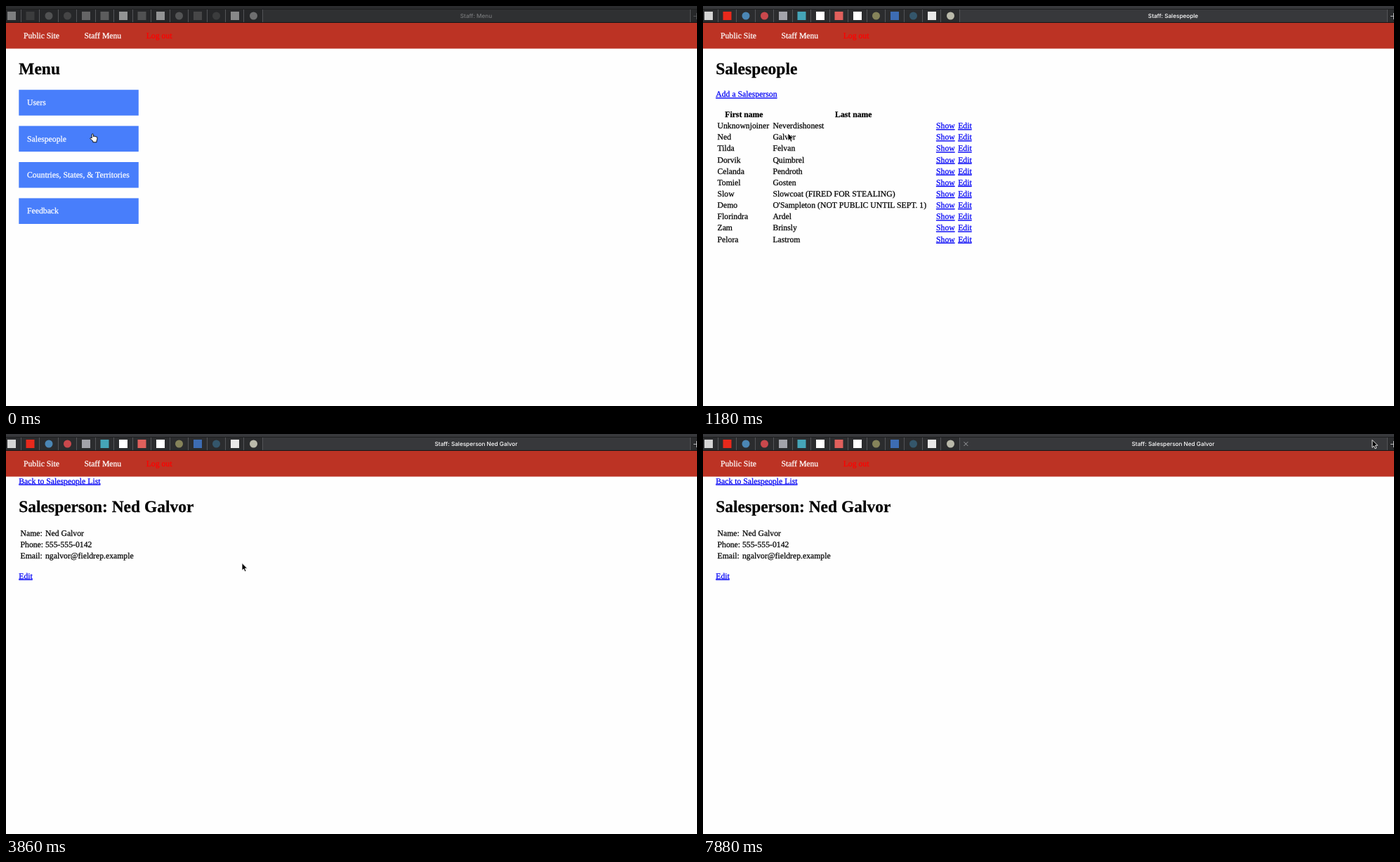
Recreate the animation shown at these times as an HTML page. Size 984 px wide and 569 px high, loop 8000 ms.

```html
<!DOCTYPE html>
<html lang="en">
<head>
<meta charset="utf-8">
<title>Staff</title>
<style>
  html, body { margin: 0; width: 984px; height: 569px; overflow: hidden; background: #fefefe; }
  svg { display: block; }
  text {
    font: 11.73px "Liberation Serif", Times, serif; text-rendering: geometricPrecision; white-space: pre;
    color: #000; fill: currentColor; stroke: currentColor; stroke-width: .25;
  }
  .h1 { font-size: 23.47px; font-weight: bold; }
  .th { font-weight: bold; text-anchor: middle; }
  .link { color: #0000f5; text-decoration: underline; }
  .light { color: #fff; }
  .alert { color: #f00; }
  .tab { font: 500 8.2px Inter, sans-serif; text-anchor: middle; stroke: none; }
</style>
</head>
<body>
<svg id="stage" width="984" height="569" viewBox="0 0 984 569"></svg>
<script>
const NS = 'http://www.w3.org/2000/svg';
const stage = document.getElementById('stage');

function add(parent, tag, attrs = {}, content) {
  const el = document.createElementNS(NS, tag);
  for (const key in attrs) el.setAttribute(key, attrs[key]);
  if (content) el.textContent = content;
  parent.appendChild(el);
  return el;
}
const rect = (p, x, y, width, height, fill) => add(p, 'rect', { x, y, width, height, fill });
const label = (p, x, y, str, cls = '') => add(p, 'text', { x, y, class: cls }, str);
const group = () => add(stage, 'g');

const LOOP = 8000;
const ROW = 16.14;
const PERSON = 'Ned Galvor';

// Browser tab strip
const bar = group();
const strip = rect(bar, 0, 0, 984, 24, '#343538');
const tabs = rect(bar, 0, 5, 984, 18, '#2c2d2f');
const current = rect(bar, 366, 5, 608, 18, '#37383b');
rect(bar, 0, 4, 984, 1, '#1d1e1f');
rect(bar, 0, 23, 984, 1, '#151516');
const icons = add(bar, 'g');
const iconColors = ['#d4d4d4', '#e8291c', '#4b86b4', '#c9484c', '#a2a3aa', '#45a5b8', '#fff',
  '#e0605c', '#fff', '#85835a', '#3d6cb3', '#34566b', '#e8e8e8', '#b9b9aa'];
const round = [2, 3, 9, 11, 13];
iconColors.forEach((fill, i) => {
  const cx = 8 + i * 26.5;
  if (round.includes(i)) add(icons, 'circle', { cx, cy: 14, r: 5.5, fill });
  else rect(icons, cx - 6, 8, 12, 12, fill);
  rect(bar, Math.round(20.7 + i * 26.48), 5, 1, 18, '#535457');
});
rect(bar, 974, 5, 1, 18, '#535457');
const plus = add(bar, 'path', { d: 'M979 14.5H988M983.5 10V19', stroke: '#b8b8ba' });
const close = add(bar, 'path', { d: 'M371.5 11.2L377.3 17M377.3 11.2L371.5 17', stroke: '#a9aaad', 'stroke-width': 0.9 });
const title = label(bar, 669.5, 17, '', 'tab');

// Site navigation
const nav = group();
rect(nav, 0, 24, 984, 36.6, '#bc3324');
label(nav, 24.9, 46.1, 'Public Site', 'light');
label(nav, 111.4, 46.1, 'Staff Menu', 'light');
label(nav, 199.7, 46.1, 'Log out', 'alert');

// Menu page
const menu = group();
label(menu, 18.3, 97.4, 'Menu', 'h1');
const buttons = ['Users', 'Salespeople', 'Countries, States, & Territories', 'Feedback'].map((str, i) => {
  const y = 119.2 + i * 51.4;
  const box = rect(menu, 18.3, y, 170.5, 36.6, '#487efb');
  label(menu, 30, y + 22, str, 'light');
  return box;
});

// List page
const list = group();
label(list, 18.3, 97.4, 'Salespeople', 'h1');
label(list, 18.3, 129.4, 'Add a Salesperson', 'link');
label(list, 58.4, 158, 'First name', 'th');
label(list, 214.3, 158, 'Last name', 'th');
[
  ['Unknownjoiner', 'Neverdishonest'],
  PERSON.split(' '),
  ['Tilda', 'Felvan'],
  ['Dorvik', 'Quimbrel'],
  ['Celanda', 'Pendroth'],
  ['Tomiel', 'Gosten'],
  ['Slow', 'Slowcoat (FIRED FOR STEALING)'],
  ['Demo', "O'Sampleton (NOT PUBLIC UNTIL SEPT. 1)"],
  ['Florindra', 'Ardel'],
  ['Zam', 'Brinsly'],
  ['Pelora', 'Lastrom']
].forEach(([first, last], i) => {
  const y = 174.2 + i * ROW;
  label(list, 20.5, y, first);
  label(list, 99.4, y, last);
  label(list, 332, y, 'Show', 'link');
  label(list, 363.2, y, 'Edit', 'link');
});

// Detail page
const detail = group();
label(detail, 18.3, 70.6, 'Back to Salespeople List', 'link');
label(detail, 18.3, 110.6, 'Salesperson: ' + PERSON, 'h1');
[
  ['Name:', PERSON],
  ['Phone:', '555-555-0142'],
  ['Email:', 'ngalvor@fieldrep.example']
].forEach(([key, value], i) => {
  label(detail, 20.5, 144.7 + i * ROW, key);
  label(detail, 56, 144.7 + i * ROW, value);
});
label(detail, 18.3, 205.7, 'Edit', 'link');

// Pointer
const pointer = group();
const arrow = add(pointer, 'path', {
  d: 'M0 0V10.8L2.4 8.5 4.1 12.3 6 11.5 4.4 7.7H7.7Z',
  fill: '#000', stroke: '#fff', 'stroke-width': 0.9
});
const hand = add(pointer, 'path', {
  d: 'M1.2 7V2a1.1 1.1 0 0 1 2.2 0V5a1 1 0 0 1 2 .1a1 1 0 0 1 1.9 .3a.9 .9 0 0 1 1.6 .6V8.5L8 11V12.8H2.8V11L-.9 8a1 1 0 0 1 1.3-1.5Z',
  fill: '#fff', stroke: '#000', 'stroke-width': 0.9
});

// Step tables: [start ms, value...]
const ARROW = 0, HAND = 1;
const moves = [
  [0, 121, 181, HAND], [740, 121, 181, ARROW],
  [1930, 145, 177, ARROW], [2080, 206, 169, ARROW], [2230, 261, 166.5, ARROW], [2380, 295, 168, ARROW],
  [2520, 315, 172, ARROW], [2670, 328, 177, ARROW], [2820, 333, 181, HAND], [2970, 335, 182, HAND],
  [3120, 335, 184, HAND], [3260, 335.5, 185, HAND], [3410, 336, 183.5, HAND], [3710, 336, 183.5, ARROW],
  [5210, 362, 137, ARROW], [5350, 405, 62, ARROW], [5500, 433, 13, ARROW],
  [6390, 447, 9, ARROW], [6540, 482, 11, ARROW], [6690, 505, 12.5, ARROW],
  [7290, 652, 13, ARROW], [7440, 845, 13, ARROW], [7740, 915, 10, ARROW], [7880, 953, 8.5, ARROW]
];
const pages = [
  [0, menu, 'Staff: Menu'],
  [1180, list, 'Staff: Salespeople'],
  [3860, detail, 'Staff: Salesperson ' + PERSON]
];
const hover = [[0, '#487efb'], [150, '#3e6edb'], [590, '#4172e2'], [740, '#3e6edb']];
const closing = [[0, 0], [5500, 0.15], [6390, 1]];

const at = (steps, t) => steps.findLast(step => step[0] <= t);

function draw(t) {
  const [, page, name] = at(pages, t);
  for (const [, p] of pages) p.style.display = p === page ? '' : 'none';
  if (title.textContent !== name) title.textContent = name;

  const active = t >= 150;
  strip.setAttribute('fill', active ? '#38393c' : '#2b2c2e');
  tabs.setAttribute('fill', active ? '#2b2c2e' : '#262729');
  current.setAttribute('fill', active ? '#37383b' : '#2f3032');
  title.style.color = active ? '#fff' : '#77787a';
  icons.style.filter = active ? 'none' : 'grayscale(1) opacity(.5)';
  plus.style.opacity = active ? 1 : 0.3;
  close.style.opacity = at(closing, t)[1];
  buttons[1].setAttribute('fill', at(hover, t)[1]);

  const [, x, y, shape] = at(moves, t);
  pointer.setAttribute('transform', `translate(${x} ${y})`);
  arrow.style.display = shape === ARROW ? '' : 'none';
  hand.style.display = shape === HAND ? '' : 'none';
}

const start = performance.now();
function tick() {
  draw((performance.now() - start) % LOOP);
  requestAnimationFrame(tick);
}
tick();
</script>
</body>
</html>
```
